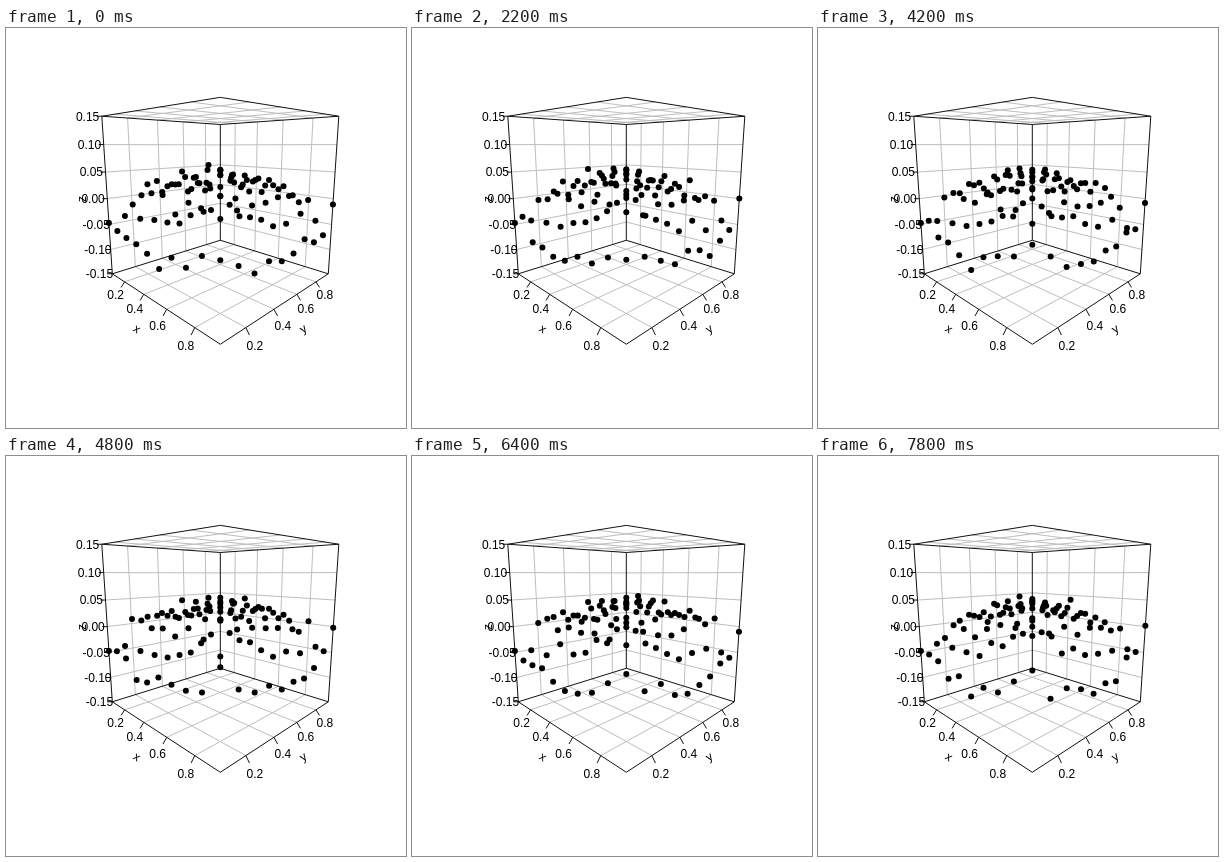
Write an HTML page that moves like this. It is 400 px wide and 400 px high and loops after 8000 ms.

```html
<!DOCTYPE html>
<html lang="en">
<head>
<meta charset="utf-8">
<title>3D scatter</title>
<style>
  html, body { margin: 0; width: 100%; height: 100%; overflow: hidden; background: #fff; }
  svg { display: block; width: 100%; height: 100%; }
  path { fill: none; stroke: #111; stroke-width: 1; }
  .grid { stroke: #bebebe; }
  text { font: 12px "Liberation Sans", Arial, sans-serif; text-anchor: middle; fill: #000; }
</style>
</head>
<body>
<svg viewBox="0 0 400 400"></svg>
<script>
const svg = document.querySelector('svg');
const STEP = 200, STEPS = 40, N = 10;

function add(tag, attrs, content = '') {
  const node = document.createElementNS('http://www.w3.org/2000/svg', tag);
  for (const key in attrs) node.setAttribute(key, attrs[key]);
  node.textContent = content;
  svg.append(node);
  return node;
}

// Perspective view of the unit cube: a along x, b along y, c along z.
function project(a, b, c) {
  const depth = a - b;
  const w = 1 - 0.355 * depth - 0.0886 * c;
  return [214.3 + 108 * (a + b - 1) / w, (245.8 - 41.8 * depth - 165.4 * c) / w];
}

const trace = points => 'M' + points.map(p => p.map(v => v.toFixed(2))).join('L');
const line = (points, kind) => add('path', { d: trace(points.map(p => project(...p))), class: kind });
const label = (x, y, content, turn = 0) =>
  add('text', { x, y: y + 4.3, transform: `rotate(${turn} ${x} ${y})` }, content);

const ticks = [0.2, 0.4, 0.6, 0.8];
const unit = v => (v - 0.05) / 0.9;
const level = z => (z + 0.15) / 0.3;

function drawBox() {
  for (const t of ticks.map(unit)) {
    for (const c of [0, 1]) {
      line([[t, 0, c], [t, 1, c]], 'grid');
      line([[0, t, c], [1, t, c]], 'grid');
    }
    line([[t, 1, 0], [t, 1, 1]], 'grid');
    line([[0, t, 0], [0, t, 1]], 'grid');
  }
  for (let k = 1; k < 6; k++) line([[0, 0, k / 6], [0, 1, k / 6], [1, 1, k / 6]], 'grid');
  for (const c of [0, 1]) line([[0, 0, c], [1, 0, c], [1, 1, c], [0, 1, c], [0, 0, c]], 'edge');
  for (const [a, b] of [[0, 0], [0, 1], [1, 1]]) line([[a, b, 0], [a, b, 1]], 'edge');
}

function drawAxes() {
  for (const v of ticks) {
    const t = unit(v);
    for (const [a, b, side] of [[t, 0, -1], [1, t, 1]]) {
      const [x, y] = project(a, b, 0);
      const drop = 12.5 / (1 - 0.355 * (a - b));
      add('path', { d: trace([[x, y], [x + side * 3.6, y + drop * 0.42]]) });
      label(x + side * 9, y + drop, v.toFixed(1));
    }
  }
  for (let k = 0; k <= 6; k++) {
    const [x, y] = project(0, 0, k / 6);
    add('path', { d: trace([[x, y], [x - 5, y]]) });
    label(x - (k < 3 ? 12.8 : 14.2), y, (k * 0.05 - 0.15).toFixed(2));
  }
  label(131, 300.5, 'x', 33);
  label(297, 300.5, 'y', -33);
  label(75.5, 171, 'z', -90);
}

function random(seed) {
  let h = Math.imul(seed ^ 0x9e3779b9, 0x85ebca6b);
  h = Math.imul(h ^ h >>> 13, 0xc2b2ae35);
  h = Math.imul(h ^ h >>> 16, 0x27d4eb2d);
  return ((h ^ h >>> 15) >>> 0) / 2 ** 32;
}

function jitter(seed) {
  return 2 * (random(seed * 3) + random(seed * 3 + 1) + random(seed * 3 + 2) - 1.5);
}

// A dome whose rim dips halfway along each side.
function surface(i, j) {
  const ring = Math.min(i, j, N - 1 - i, N - 1 - j);
  const corner = (i === ring || i === N - 1 - ring) && (j === ring || j === N - 1 - ring);
  if (ring > 0) return [0, 0.008, 0.027, 0.044, 0.049][ring] - (ring === 1 && corner ? 0.01 : 0);
  if (corner) return -0.03 + 0.017 * (i + j - 9) / 9;
  return -0.032 - 0.045 * (Math.sin(Math.PI * i / 9) + Math.sin(Math.PI * j / 9));
}

function spread(i, j) {
  if (i + j === 0) return 0;
  return Math.min(i, j, N - 1 - i, N - 1 - j) < 2 ? 0.008 : 0.0055;
}

drawBox();
drawAxes();

const dots = Array.from({ length: N * N }, (_, k) => {
  const i = k % N, j = Math.floor(k / N);
  return { i, j, k, z: surface(i, j), sd: spread(i, j), node: add('circle', { r: 3 }) };
});

function place(step) {
  for (const { i, j, k, z, sd, node } of dots) {
    const height = level(z + sd * jitter(step * N * N + k + 1));
    const [x, y] = project(i / 9, j / 9, height);
    node.setAttribute('cx', x.toFixed(2));
    node.setAttribute('cy', y.toFixed(2));
  }
}

let shown = -1;
function tick() {
  const step = Math.floor(performance.now() / STEP) % STEPS;
  if (step !== shown) place(shown = step);
  requestAnimationFrame(tick);
}
tick();
</script>
</body>
</html>
```
